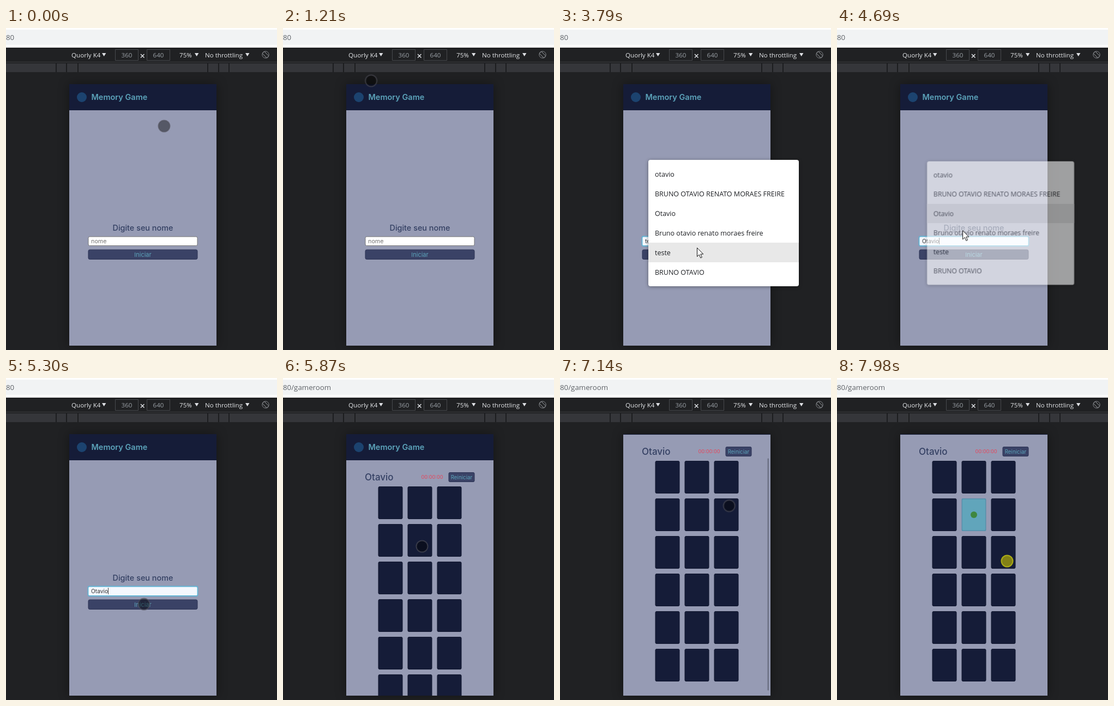
Write an HTML page that moves like this. It is 497 px wide and 591 px high and loops after 8 s.

```html
<!DOCTYPE html>
<html lang="pt">
<head>
<meta charset="utf-8">
<title>Memory Game</title>
<style>
html, body { margin: 0; width: 100%; height: 100%; overflow: hidden; background: #202123; }
svg { display: block; width: 497px; height: 591px; }
text { white-space: pre; }
.ui { font-family: "Open Sans", "Noto Sans", sans-serif; font-size: 11.6px; fill: #e4e6e9; }
.app { font-family: Inter, sans-serif; font-size: 11px; fill: #5ca4bb; }
.mid { text-anchor: middle; }
.dim { fill: #9aa0a6; }
.ink { fill: #344063; font-weight: 500; }
.button { fill: #3a4266; stroke: #2c3354; }
.card { fill: #151c38; stroke: #11172f; }

/* One 8 s clock: 1% = 80 ms */
.run { animation: 8s linear infinite; }
.step { animation: 8s step-end infinite; }

.login { animation-name: login; }
.room { animation-name: room; }
@keyframes login { 0% { visibility: visible } 69.4%, 100% { visibility: hidden } }
@keyframes room { 0% { visibility: hidden } 69.4%, 100% { visibility: visible } }

.scroll { animation-name: scroll; }
@keyframes scroll {
  0%, 82% { transform: none }
  84.1% { transform: translateY(-17px) }
  87.2%, 100% { transform: translateY(-47px) }
}
.thumb { animation-name: thumb; }
@keyframes thumb {
  0%, 82% { transform: none; opacity: 0 }
  82.4% { opacity: 1 }
  84.1% { transform: translateY(15px) }
  87.2% { transform: translateY(42px) }
  91% { opacity: 1 }
  94%, 100% { transform: translateY(42px); opacity: 0 }
}

.focus { animation-name: focus; }
.hint { animation-name: hint; }
.guess { animation-name: guess; }
.chosen { animation-name: chosen; }
@keyframes focus { 0% { visibility: hidden } 38.2% { visibility: visible } 69.4%, 100% { visibility: hidden } }
@keyframes hint { 0% { visibility: visible } 43%, 100% { visibility: hidden } }
@keyframes guess { 0% { visibility: hidden } 43% { visibility: visible } 52.5%, 100% { visibility: hidden } }
@keyframes chosen { 0% { visibility: hidden } 52.5% { visibility: visible } 69.4%, 100% { visibility: hidden } }

.popup { animation-name: popup; transform-origin: 300px 358px; filter: drop-shadow(0 1px 3px #0006); }
@keyframes popup {
  0%, 39.2% { opacity: 0; transform: scale(.95) }
  40.9%, 57.4% { opacity: 1; transform: none }
  60.3%, 100% { opacity: 0; transform: scale(.948) }
}
.row { animation-name: row; }
@keyframes row {
  0% { transform: translateY(108px) }
  43% { transform: translateY(144px) }
  49.5% { transform: translateY(108px) }
  52.5%, 100% { transform: translateY(72px) }
}

.back, .face { transform-box: fill-box; transform-origin: center; }
.back { animation-name: back; }
.face { animation-name: face; }
@keyframes back {
  0%, 94% { transform: none; animation-timing-function: ease-in }
  95.7%, 100% { transform: scaleX(0) }
}
@keyframes face {
  0%, 95.7% { transform: scaleX(0); animation-timing-function: ease-out }
  97.5%, 100% { transform: none }
}

.pointer { animation-name: pointer; }
@keyframes pointer {
  0%, 3.25% { transform: translate(290px, 180px) }
  6% { transform: translate(235px, 125px) }
  9.5% { transform: translate(180px, 36px) }
  13.4% { transform: translate(185px, 60px) }
  16% { transform: translate(150px, 115px) }
  20.2%, 22% { transform: translate(245px, 142px) }
  27.5% { transform: translate(200px, 76px) }
  30.5%, 32% { transform: translate(240px, 327px) }
  33%, 35.5% { transform: translate(265px, 348px) }
  38%, 39.4% { transform: translate(250px, 391px) }
  43% { transform: translate(251px, 398px) }
  45%, 47.5% { transform: translate(251px, 403px) }
  49.5% { transform: translate(250px, 392px) }
  52.5% { transform: translate(236px, 356px) }
  55%, 57.2% { transform: translate(230px, 340px) }
  58.6% { transform: translate(230px, 371px) }
  60.5% { transform: translate(235px, 390px) }
  64%, 69.4% { transform: translate(253px, 415px) }
  73.3%, 76.2% { transform: translate(255px, 309px) }
  82% { transform: translate(348px, 271px) }
  84.1% { transform: translate(348px, 254px) }
  87.2% { transform: translate(348px, 224px) }
  92.5%, 96.5% { transform: translate(251px, 251px) }
  99.3%, 100% { transform: translate(312px, 336px) }
}
.touch { animation-name: touch; }
@keyframes touch {
  0% { visibility: visible }
  7.2% { visibility: hidden }
  15% { visibility: visible }
  27.3% { visibility: hidden }
  30.5% { visibility: visible }
  39.4% { visibility: hidden }
  60.5%, 100% { visibility: visible }
}
.arrow { animation-name: arrow; }
@keyframes arrow {
  0% { visibility: hidden }
  7.2% { visibility: visible }
  15% { visibility: hidden }
  39.4% { visibility: visible }
  60.5%, 100% { visibility: hidden }
}
.press { animation-name: press; }
@keyframes press {
  0% { fill: #0000006e; stroke: #50505a99 }
  38% { fill: #b0ac08b3; stroke: #bcbc14d9 }
  39.4% { fill: #0000006e; stroke: #50505a99 }
  66.3% { fill: #b0ac08b3; stroke: #bcbc14d9 }
  67.6% { fill: #0000006e; stroke: #50505a99 }
  82% { fill: #b0ac08b3; stroke: #bcbc14d9 }
  87.3% { fill: #0000006e; stroke: #50505a99 }
  92.8% { fill: #b0ac08b3; stroke: #bcbc14d9 }
  94% { fill: #0000006e; stroke: #50505a99 }
  99.3%, 100% { fill: #b0ac08b3; stroke: #bcbc14d9 }
}
</style>
</head>
<body>
<svg viewBox="0 0 497 591">
  <defs>
    <clipPath id="screen"><path d="M116 103h270v480H116z"/></clipPath>
    <path id="caret" d="M0 0h7.4L3.7 6z" fill="#dfe1e5"/>
  </defs>

  <!-- Browser and device toolbar -->
  <rect width="497" height="591" fill="#202123"/>
  <rect width="497" height="36" fill="#fff"/>
  <rect y="3" width="497" height="28" fill="#f1f3f4"/>
  <text class="ui" y="22" style="font-size:13.3px;fill:#5f6368">80<tspan class="step room">/gameroom</tspan></text>
  <g class="ui">
    <text x="120" y="54">Quorly K4</text>
    <text x="318" y="54">75%</text>
    <text x="365" y="54">No throttling</text>
    <path d="M200.5 39.5h42v20h-42zM258.5 39.5h42v20h-42z" fill="none" stroke="#47494d"/>
    <g class="mid">
      <text class="dim" x="221.5" y="54">360</text>
      <text class="dim" x="279.5" y="54">640</text>
    </g>
    <path d="M247 48l6.5 6.5m0-6.5L247 54.500" stroke="#dfe1e5" stroke-width="1.5"/>
  </g>
  <use href="#caret" x="176" y="46"/>
  <use href="#caret" x="346" y="46"/>
  <use href="#caret" x="439" y="46"/>
  <g transform="translate(476 49)" fill="none" stroke="#85888c">
    <circle r="6.2"/>
    <rect x="-2.500" y="-6" width="5" height="12" rx="1" transform="rotate(-45)"/>
  </g>
  <path d="M0 62.500h497" stroke="#3c3d40"/>
  <path d="M0 65h497v16H0z" fill="#35363a"/>
  <path d="M92 65v16M111 65v16M132 65v16M370 65v16M390 65v16M409 65v16" stroke="#1c1d1f" stroke-width="2"/>

  <!-- Phone -->
  <rect x="116" y="103" width="270" height="480" fill="#969bb4" style="filter:drop-shadow(0 0 10px #0006)"/>
  <g class="app" clip-path="url(#screen)">
    <g class="run scroll">
      <rect x="116" y="103" width="270" height="48" fill="#151c38"/>
      <circle cx="139" cy="127" r="9" fill="#1c436f"/>
      <text x="156.500" y="132" font-weight="600" style="font-size:14.500px">Memory Game</text>

      <g class="step room">
        <text class="ink" x="150" y="188" style="font-size:17px">Otavio</text>
        <text x="253.500" y="185" style="font-size:9.200px;fill:#e8445a">00:00:00</text>
        <rect class="button" x="304" y="173.500" width="47" height="17" rx="2"/>
        <text class="mid" x="327.500" y="185.500" style="font-size:9.800px">Reiniciar</text>
        <g id="cards"></g>
        <g class="run face">
          <rect x="228.500" y="268" width="45" height="60" rx="2" fill="#5690ab"/>
          <rect x="230" y="269.500" width="42" height="57" rx="2" fill="#61a5bb"/>
          <circle cx="251" cy="298" r="6" fill="#3f873f"/>
        </g>
      </g>
    </g>

    <g class="step login">
      <text class="ink mid" x="251" y="372" style="font-size:14.400px">Digite seu nome</text>
      <rect x="151" y="383" width="200" height="16.500" rx="2.500" fill="#fff" stroke="#767676"/>
      <rect class="step focus" x="150.500" y="382.500" width="201" height="17.500" rx="2.500" fill="#f4f8fe" stroke="#62b3d3" stroke-width="1.800"/>
      <text class="step hint" x="156" y="394.500" style="font-size:10.800px;fill:#757575">nome</text>
      <text class="step guess" x="156" y="394.500" style="font-size:10.500px;fill:#333">teste</text>
      <g class="step chosen">
        <text x="156" y="394.500" style="font-size:10.200px;fill:#333">Otavio</text>
        <path d="M187.500 385v12" stroke="#444"/>
      </g>
      <rect class="button" x="151" y="407" width="200" height="17.500" rx="2.500"/>
      <text class="mid" x="251" y="419.500">Iniciar</text>
    </g>
    <rect class="run thumb" x="380.500" y="105.500" width="2.500" height="426" rx="1" fill="#6d7286"/>
  </g>

  <!-- Autofill list -->
  <g class="run popup">
    <rect x="162" y="242" width="276" height="232" rx="4" fill="#fff"/>
    <rect class="step row" x="162" y="250" width="276" height="36" fill="#e8e8e8"/>
    <g id="names" class="ui" style="font-size:12.500px;fill:#1d1f23"></g>
  </g>

  <g class="run pointer">
    <g class="step touch"><circle class="step press" r="10.500" stroke-width="2"/></g>
    <path class="step arrow" d="M.5.5v16l3.700-3.500 2.600 6 2.600-1.100-2.600-5.900h5z" fill="#fff" stroke="#111"/>
  </g>
</svg>
<script>
const add = (parent, tag, attrs, text = "") => {
  const el = document.createElementNS("http://www.w3.org/2000/svg", tag);
  for (const key in attrs) el.setAttribute(key, attrs[key]);
  el.textContent = text;
  document.getElementById(parent).append(el);
};

for (let i = 0; i < 18; i++) {
  add("cards", "rect", {
    class: i === 4 ? "card run back" : "card",
    x: 175 + 54 * (i % 3), y: 199.5 + 69 * Math.floor(i / 3),
    width: 44, height: 59, rx: 2
  });
}

const fullName = "Bruno otavio renato moraes freire";
["otavio", fullName.toUpperCase(), "Otavio", fullName, "teste", "BRUNO OTAVIO"]
  .forEach((name, i) => add("names", "text", { x: 174, y: 272.5 + 36 * i }, name));
</script>
</body>
</html>
```
